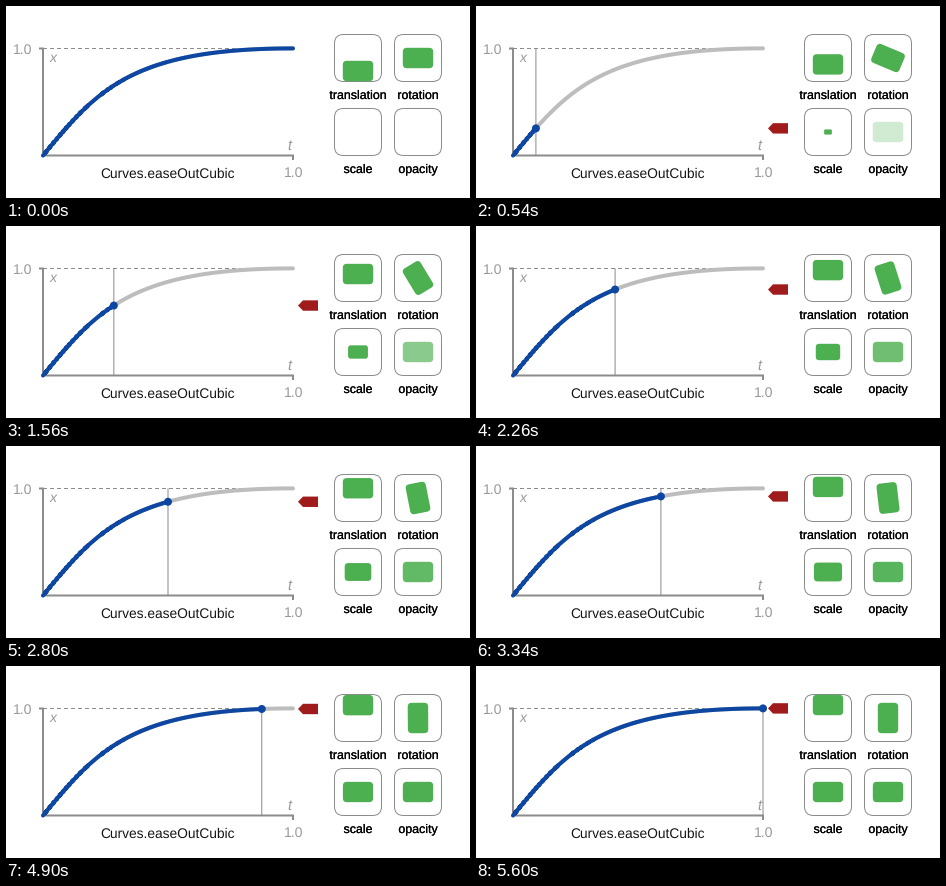
Write a matplotlib script that moves like this. It is 464x192 px and loops after 5.62 s.

```python
import numpy as np
import matplotlib.pyplot as plt
import matplotlib.patheffects as pe
from matplotlib.animation import FuncAnimation
from matplotlib.patches import Circle, FancyBboxPatch, Polygon
from matplotlib.transforms import Affine2D

W, H, DPI = 464, 192, 64
PX = 72 / DPI                       # one pixel in points
TICK, LOOP, STEPS = 20, 5620, 120

LEFT, RIGHT, TOP, BOTTOM = 37, 287, 42.4, 149.5
BLUE, GREEN, RED = "#0d47a1", "#4caf50", "#a01c1c"
AXIS, FADED, LABEL = "#8c8c8c", "#bdbdbd", "#999999"

plt.rcParams["font.family"] = "Liberation Sans"
plt.rcParams["text.hinting"] = "none"
plt.rcParams["path.simplify"] = False


def bezier(a, b, s):
    return 3 * a * s * (1 - s) ** 2 + 3 * b * s * s * (1 - s) + s ** 3


def ease_out_cubic(t, tolerance=0.001):
    """Bisect the curve parameter; the tolerance leaves small stairs."""
    if t <= 0 or t >= 1:
        return float(t >= 1)
    lo, hi = 0.0, 1.0
    while True:
        mid = (lo + hi) / 2
        x = bezier(0.215, 0.355, mid)
        if abs(t - x) < tolerance:
            return bezier(0.61, 1.0, mid)
        lo, hi = (mid, hi) if x < t else (lo, mid)


def to_px(t, x):
    return LEFT + t * (RIGHT - LEFT), BOTTOM - x * (BOTTOM - TOP)


def curve(tolerance):
    return to_px(ts, np.array([ease_out_cubic(t, tolerance) for t in ts]))


fig = plt.figure(figsize=(W / DPI, H / DPI), dpi=DPI, facecolor="white")
ax = fig.add_axes([0, 0, 1, 1])
ax.set(xlim=(0, W), ylim=(H, 0))
ax.axis("off")


def line(xs, ys, color, width, z, **kw):
    return ax.plot(xs, ys, color=color, lw=width * PX, zorder=z, snap=False,
                   solid_joinstyle="miter", **kw)[0]


def text(x, y, s, size, color, ha="center", **kw):
    return ax.text(x, y, s, fontsize=size * PX, color=color, ha=ha,
                   va="baseline", zorder=3, **kw)


def rounded(x, y, w, h, r, **kw):
    style = f"round,pad=0,rounding_size={r}"
    return ax.add_patch(FancyBboxPatch((x, y), w, h, boxstyle=style, **kw))


# Graph
line([LEFT, RIGHT], [42.5, 42.5], AXIS, 1, 1, dashes=(4, 3), dash_capstyle="butt")
line([33, LEFT, LEFT, RIGHT, RIGHT], [42.5, 42.5, BOTTOM, BOTTOM, 154],
     AXIS, 2, 2, solid_capstyle="butt")
text(26.5, 47.6, "1.0", 14, LABEL, "right")
text(287.5, 171, "1.0", 14, LABEL)
text(43.5, 55.5, "x", 14, LABEL, "left", style="italic")
text(281, 144, "t", 14.5, LABEL, "left", style="italic")
text(162, 172, "Curves.easeOutCubic", 13.8, "#151515")

ts = np.linspace(0, 1, 751)
cx, cy = curve(0.001)
line(*curve(1e-6), FADED, 4, 4, solid_capstyle="round")
trace = line(cx, cy, BLUE, 4, 6, solid_capstyle="round")
cursor = line([LEFT, LEFT], [TOP, BOTTOM], AXIS, 1, 5, solid_capstyle="butt")
dot = ax.add_patch(Circle((0, 0), 4, fc=BLUE, lw=0, zorder=7))
pointer = ax.add_patch(Polygon([(0, 0)] * 5, closed=True, fc=RED, lw=0, zorder=7))
POINTER = np.array([(292, 0), (297, -5.2), (312, -5.2), (312, 5.2), (297, 5.2)])


def tile(x, y, name):
    rounded(x - 23.5, y - 23.5, 47, 47, 9, fc="white", ec=AXIS, lw=PX, zorder=2)
    text(x, y + 41, name, 12.4, "black",
         path_effects=[pe.withStroke(linewidth=0.2 * PX, foreground="black")])
    return rounded(-15.2, -10.2, 30.4, 20.4, 4, fc=GREEN, lw=0, zorder=3)


SPOTS = {"translation": (352, 52), "rotation": (412, 52),
         "scale": (352, 126), "opacity": (412, 126)}
blocks = {name: tile(*spot, name) for name, spot in SPOTS.items()}


def place(name, move):
    blocks[name].set_transform(move.translate(*SPOTS[name]) + ax.transData)


def step_at(tick):
    """Steps last 20, 100 and 20 ms in turn."""
    cycle, part = divmod(tick, 7)
    return 3 * cycle + (part > 0) + (part > 5)


def draw(tick):
    step = step_at(tick)
    t = step / STEPS
    x = ease_out_cubic(t)
    px, py = to_px(t, x)

    running = step > 0
    for artist in (cursor, dot, pointer):
        artist.set_visible(running)
    done = ts <= (t if running else 1)
    trace.set_data(cx[done], cy[done])
    cursor.set_xdata([px, px])
    dot.center = px, py
    pointer.set_xy(POINTER + (0, py))

    place("translation", Affine2D().translate(0, 13 - 26 * x))
    place("rotation", Affine2D().rotate_deg(90 * x))
    place("scale", Affine2D().scale(max(x, 1e-6)))
    place("opacity", Affine2D())
    blocks["opacity"].set_alpha(x)
    return []


anim = FuncAnimation(fig, draw, frames=LOOP // TICK, interval=TICK,
                     init_func=lambda: draw(0), repeat=True, repeat_delay=0)
plt.show()
```
